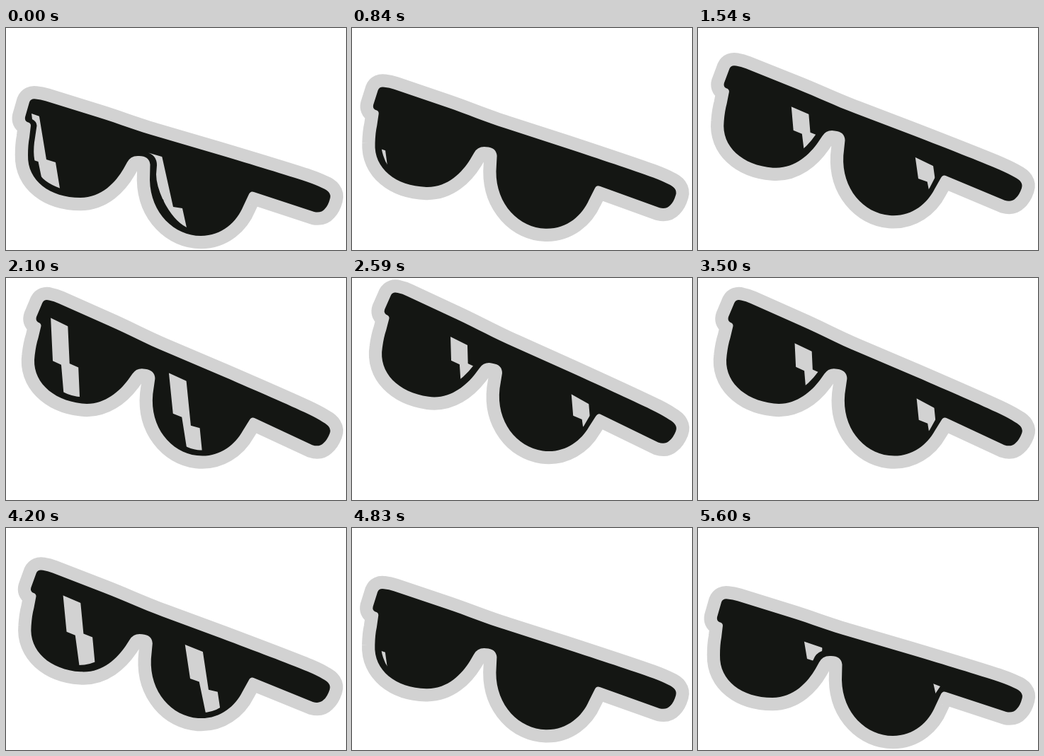
These frames come from a looping animation (480 px wide and 314 px high, 5.67 s). An HTML page with a canvas:

```html
<!DOCTYPE html>
<html lang="en">
<head>
<meta charset="utf-8">
<title>Sunglasses</title>
<style>
  html, body { margin: 0; width: 100%; height: 100%; overflow: hidden; background: #fff; }
  canvas { display: block; }
</style>
</head>
<body>
<canvas id="stage" width="480" height="314"></canvas>
<script>
const ctx = document.getElementById('stage').getContext('2d');
const FRAME_MS = 70, FRAMES = 81;
const TILT = 0.138, PIVOT = [636, 226];
const BLACK = '#141613', GREY = '#d2d2d2';

const body = new Path2D(`M33 105 Q35 99.5 42 100.5 Q49 101 56 103.2 L130 126.2
  C160 135.5 185 145.5 215 154 L300 179 C350 194 395 207.5 425 217.5 Q438 222 446 226
  Q460 231.5 457.5 241 Q455 251 450 256 Q445 262 435 260 L350 232 Q345 230 342.5 236
  L335 252 C326 274 305 294 275 294 C238 294 204 262 203 215 L203.5 193
  Q202 181 188 181 Q176 180 171 190 L166 199
  C155 218 135 240 105 240 C62 240 30 216 31 180 Q31 165 33 155
  L35 138 Q35 134 30 133 Q26 131 27 126 Z`);

// Each lens: glass opening, zigzag glint and its shift per step.
const lenses = [
  {
    glass: new Path2D(`M36 121 L124.7 152 L176 169.5 L175 174 Q166 177 162.5 187
      Q150 209 135 219 Q105 238 77 227 Q50 217 45 202 Q36 183 41 155
      L43.5 138 Q43 132 37 129 Z`),
    glint: new Path2D(`M16.5 86 L40.5 86 L57 186 L70 190 L79 245
      L57 245 L45.5 189 L33 185 Z`),
    step: 24.2
  },
  {
    glass: new Path2D(`M201 176.5 L220 182 L304.6 209.4 L342 224 L334.6 235
      L328 251 Q308 286 275 286 Q265 286 255 282 Q237 273 222 244
      Q212 222 212 207 L213 194 Q213 181 201 176.5 Z`),
    glint: new Path2D(`M187 140 L211 140 L236 253 L249 255 L258 296
      L237 296 L222 242.5 L209 239 Z`),
    step: 25.5
  }
];

function drawLens({ glass, glint, step }, pose) {
  ctx.save();
  ctx.clip(glass);
  ctx.translate(pose * step, 0);
  ctx.fillStyle = GREY;
  ctx.fill(glint);
  ctx.restore();
}

function draw(frame) {
  const swing = (1 - Math.cos(2 * Math.PI * frame / (FRAMES - 1))) / 2;
  const pose = (Math.floor(frame / 2) + 1) % 7 - 1;

  ctx.fillStyle = '#fff';
  ctx.fillRect(0, 0, 480, 314);
  ctx.save();
  ctx.translate(...PIVOT);
  ctx.rotate(TILT * swing);
  ctx.translate(-PIVOT[0], -PIVOT[1]);

  ctx.lineJoin = 'round';
  ctx.lineWidth = 36.5;
  ctx.strokeStyle = GREY;
  ctx.stroke(body);
  ctx.fillStyle = BLACK;
  ctx.fill(body);
  lenses.forEach(lens => drawLens(lens, pose));
  ctx.restore();
}

const start = performance.now();
function tick() {
  const elapsed = performance.now() - start;
  draw(Math.floor(elapsed / FRAME_MS) % FRAMES);
  requestAnimationFrame(tick);
}
tick();
</script>
</body>
</html>
```
